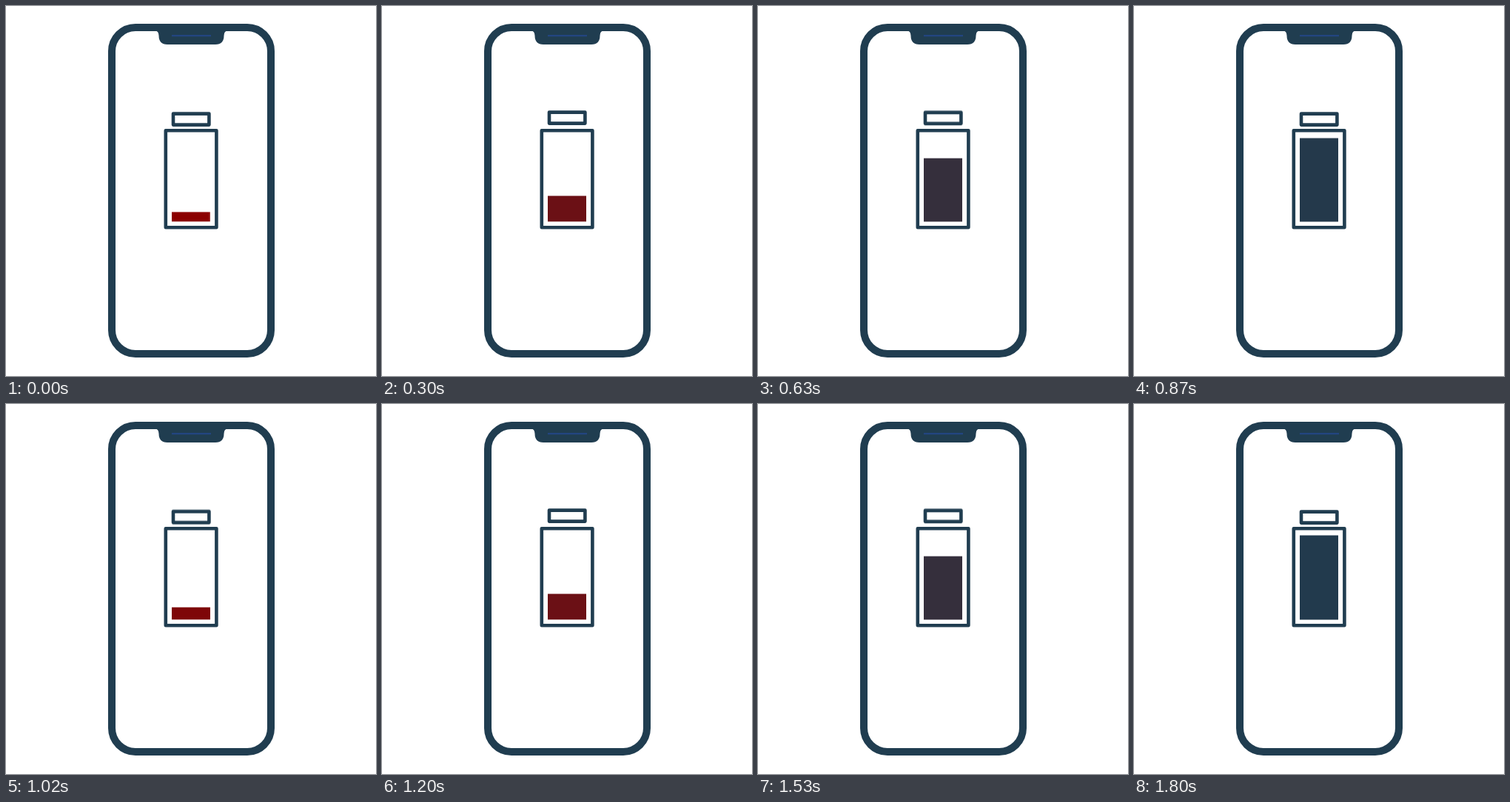
Animation of 500 by 500 pixels, one loop 3.63 s. Source, as an HTML page:

```html
<!DOCTYPE html>
<html lang="en">
<head>
<meta charset="utf-8">
<title>Charging phone</title>
<style>
  html, body { margin: 0; width: 100%; height: 100%; overflow: hidden; background: #fff; }
  svg { display: block; width: 100%; height: 100%; }
  .line { fill: none; stroke: #203d50; stroke-linejoin: round; }
  #charge { transform-origin: 250px 291.5px; }
</style>
</head>
<body>
<svg viewBox="0 0 500 500">
  <rect class="line" x="143" y="29" width="215" height="441" rx="32" stroke-width="10"/>
  <path fill="#203d50" d="M201 33 Q206.500 34 206.500 40 Q206.500 52 218 52 H283 Q294.500 52 294.500 40 Q294.500 34 300 33 Z"/>
  <path stroke="#234580" stroke-width="2.200" d="M224 40.200 H277"/>
  <rect class="line" x="215.800" y="168.200" width="68.600" height="131" stroke-width="4.600"/>
  <rect class="line" id="cap" x="226" y="145.600" width="48.400" height="15" stroke-width="4.600"/>
  <rect id="charge" x="224" y="177.500" width="52" height="114"/>
</svg>
<script>
  const LOOP = 3630, CYCLE = 900, CYCLES = 2;

  // Repeats the steps once per cycle, then holds the last pose until the loop ends.
  function play(id, steps) {
    const frames = [];
    for (let n = 0; n < CYCLES; n++) {
      for (const [at, style, easing = 'linear'] of steps) {
        frames.push({ ...style, easing, offset: (n + at) * CYCLE / LOOP });
      }
    }
    frames.push({ ...steps[steps.length - 1][1], offset: 1 });
    const animation = document.getElementById(id).animate(frames, { duration: LOOP, iterations: Infinity });
    animation.startTime = document.timeline.currentTime;
  }

  const scaleY = k => ({ transform: `scaleY(${k})` });
  const lift = y => ({ transform: `translateY(${-y}px)` });

  play('charge', [
    [0, scaleY(0.101), 'cubic-bezier(.4, .07, .72, .94)'],
    [1, scaleY(1)]
  ]);
  play('charge', [
    [0, { fill: '#8b0000' }],
    [1 / 3, { fill: '#6b1015' }],
    [0.7, { fill: '#352f3c' }],
    [1, { fill: '#223a4d' }]
  ]);
  play('cap', [
    [0, lift(0), 'ease-in-out'],
    [0.5, lift(2.6), 'ease-in-out'],
    [1, lift(0)]
  ]);
</script>
</body>
</html>
```
